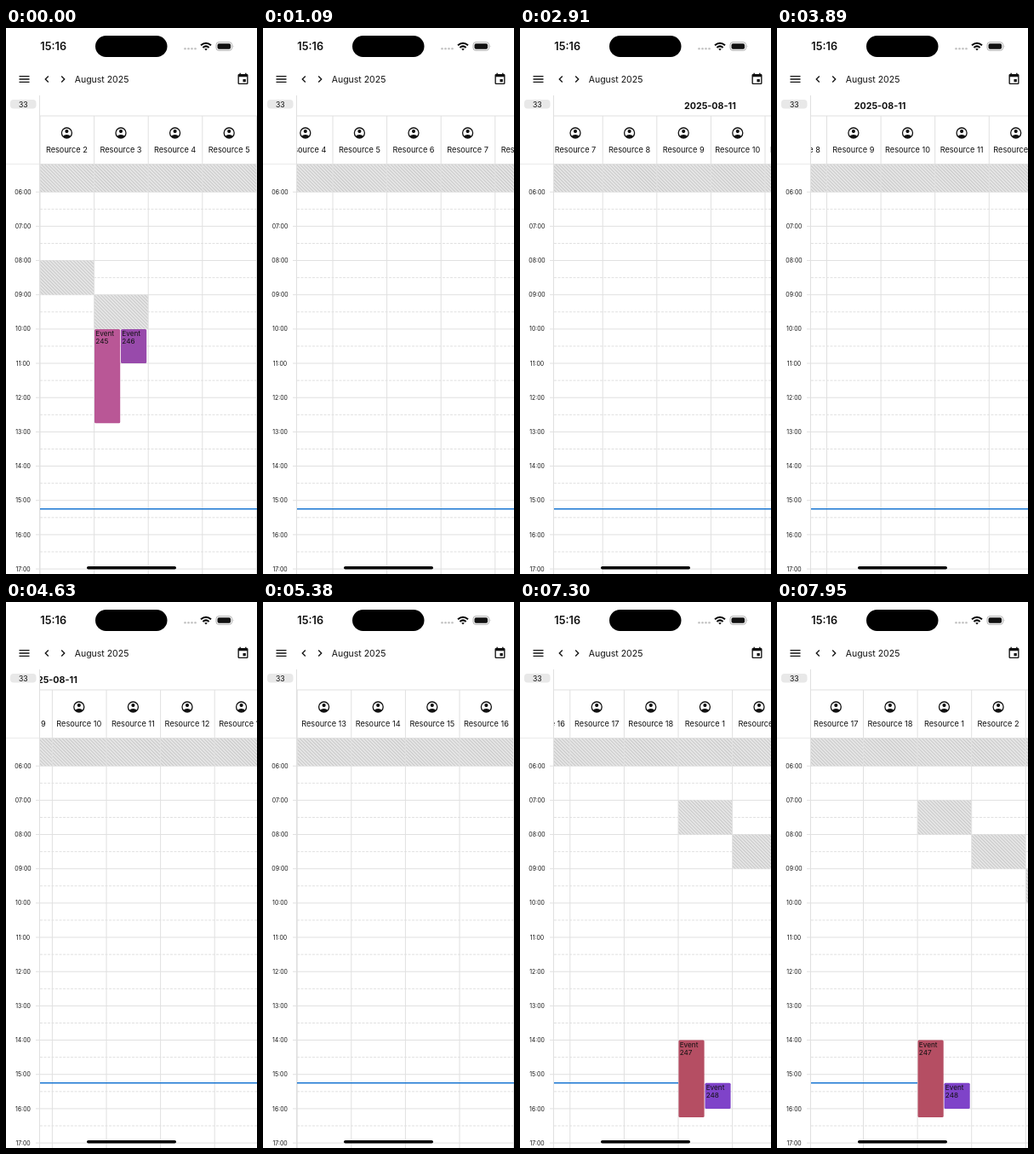
Recreate the animation shown at these times as an HTML page. Size 295 by 640 pixels, loop 8 s.

```html
<!DOCTYPE html>
<html lang="en">
<head>
<meta charset="utf-8">
<title>Resource calendar</title>
<style>
  html, body { margin: 0; width: 100%; height: 100%; overflow: hidden; background: #fff; }
  svg { display: block; width: 295px; height: 640px; font-family: Inter, Roboto, sans-serif; fill: #111; }
  .mid { text-anchor: middle; }
  .rule { stroke: #e0e0e0; stroke-width: 1; fill: none; }
  .half { stroke-dasharray: 3 1.5; }
  .faint { stroke: #ebebeb; }
  .hour { font-size: 6.9px; }
  .name { font-size: 9.2px; }
  .event { font-size: 8.2px; }
  .date { font-size: 10.7px; font-weight: 700; }
</style>
</head>
<body>
<svg viewBox="0 0 295 640">
  <defs>
    <pattern id="hatch" width="2.8" height="2.8" patternUnits="userSpaceOnUse" patternTransform="rotate(-45)">
      <rect width="2.8" height="2.8" fill="#e8e8e8"/>
      <rect width="1.1" height="2.8" fill="#c8c8c8"/>
    </pattern>
    <clipPath id="view"><rect x="39" y="79" width="256" height="561"/></clipPath>
    <g id="person">
      <circle r="6" fill="none" stroke="#111" stroke-width="1.3"/>
      <circle cy="-1.9" r="2.1"/>
      <path d="M-4.4 4.2C-3 1.4 3 1.4 4.4 4.2Q0 8 -4.4 4.2Z"/>
    </g>
  </defs>

  <g id="grid"></g>
  <g clip-path="url(#view)"><g id="content"></g></g>
  <path class="rule" d="M39.5 79V640"/>

  <!-- status bar -->
  <text class="mid" x="55.7" y="26.3" font-size="12.7" font-weight="600">15:16</text>
  <rect x="105" y="9" width="84.5" height="25" rx="12.5" fill="#000"/>
  <g fill="#c4c4c4">
    <circle cx="210.5" cy="24.3" r="1.3"/><circle cx="214.5" cy="24.3" r="1.3"/>
    <circle cx="218.5" cy="24.3" r="1.3"/><circle cx="222.5" cy="24.3" r="1.3"/>
  </g>
  <path d="M229 20.2Q235 15.2 241 20.2M231.4 22.9Q235 19.9 238.6 22.9" fill="none" stroke="#000" stroke-width="2"/>
  <path d="M233.2 24.6Q235 23.2 236.8 24.6L235 26.6Z"/>
  <rect x="247" y="16.7" width="18.6" height="9.6" rx="3" fill="none" stroke="#a5a5a5" stroke-width=".9"/>
  <rect x="248.5" y="18.2" width="15.6" height="6.6" rx="1.8"/>
  <path d="M266.8 19.8q1.3 1.7 0 3.4z" fill="#a5a5a5"/>

  <!-- toolbar -->
  <path transform="translate(13.5 52)scale(.667)" d="M3 18h18v-2H3zM3 13h18v-2H3zM3 6v2h18V6z"/>
  <path transform="translate(40 52)scale(.667)" d="M15.4 7.4L14 6l-6 6 6 6 1.4-1.4L10.8 12z"/>
  <path transform="translate(59 52)scale(.667)" d="M10 6L8.6 7.4l4.6 4.6-4.6 4.6L10 18l6-6z"/>
  <text x="80.7" y="64" font-size="10.5">August 2025</text>
  <path transform="translate(270.5 52)scale(.667)" d="M17 12h-5v5h5zM16 1v2H8V1H6v2H5a2 2 0 0 0-2 2v14a2 2 0 0 0 2 2h14a2 2 0 0 0 2-2V5a2 2 0 0 0-2-2h-1V1zM19 19H5V8h14z"/>
  <rect x="5" y="84" width="30.5" height="10.5" rx="4" fill="#e8e8e8"/>
  <text class="mid" x="20.2" y="92.6" font-size="8.6">33</text>
  <rect x="95" y="631" width="105" height="3.6" rx="1.8" fill="#000"/>
</svg>

<script>
const LOOP = 8000, LEFT = 40, COLUMN = 63.6, RESOURCES = 18, DAY = COLUMN * RESOURCES;
const $ = id => document.getElementById(id);
const hourY = hour => 192.2 + (hour - 6) * 40.17;
const columnX = index => LEFT + index * COLUMN;

const line = (x1, y1, x2, y2, kind = '') =>
  `<path class="rule ${kind}" d="M${x1} ${y1}L${x2} ${y2}"/>`;
const text = (kind, x, y, value) => `<text class="${kind}" x="${x}" y="${y}">${value}</text>`;
const blocked = (index, top, bottom, columns = 1) =>
  `<rect x="${columnX(index)}" y="${top}" width="${COLUMN * columns}" height="${bottom - top}" fill="url(#hatch)"/>`;

function event(index, slot, from, to, color, number) {
  const x = columnX(index) + 0.4 + slot * 31, y = hourY(from);
  return `<rect x="${x}" y="${y}" width="30.2" height="${hourY(to) - y}" rx="1.5" fill="${color}"/>` +
    text('event', x + 1.3, y + 8.2, 'Event') + text('event', x + 1.3, y + 17.6, number);
}

function buildGrid() {
  let out = line(LEFT, 103, 295, 103) + line(0, 159.5, LEFT, 159.5, 'faint') + line(LEFT, 159.5, 295, 159.5);
  for (let hour = 6; hour <= 17; hour++) {
    const y = hourY(hour), halfY = hourY(hour + 0.5);
    out += line(35, y, 295, y) + line(LEFT, halfY, 295, halfY, 'half') +
      text('hour mid', 20, y + 2.6, String(hour).padStart(2, '0') + ':00');
  }
  return out;
}

function buildContent() {
  const count = RESOURCES + 6;
  let out = blocked(0, 160, hourY(6), count);
  for (const first of [0, RESOURCES])
    for (let i = 0; i < 3; i++) out += blocked(first + i, hourY(7 + i), hourY(8 + i));
  for (let i = 0; i < count; i++) {
    const x = columnX(i), middle = x + COLUMN / 2 - 0.4;
    out += line(x, 103, x, 640) + `<use href="#person" x="${middle}" y="123"/>` +
      text('name mid', middle, 145.5, 'Resource ' + (i % RESOURCES + 1));
  }
  const now = hourY(15.25);
  return out + text('date mid', LEFT + DAY / 2 - 1, 94.5, '2025-08-11') +
    `<path d="M${LEFT} ${now}H${LEFT + DAY}" stroke="#1976d2" stroke-width="1.5"/>` +
    event(2, 0, 10, 12.75, '#b95796', 245) + event(2, 1, 10, 11, '#984aab', 246) +
    event(RESOURCES, 0, 14, 16.25, '#b54e63', 247) + event(RESOURCES, 1, 15.25, 16, '#7f43c9', 248);
}

// Bursts of scrolling: start ms, end ms, steps, offset reached
const START = 63.6;
const bursts = [
  [650, 850, 3, 178], [990, 1090, 2, 212.4],
  [1410, 1830, 5, 300], [2050, 2170, 2, 317], [2310, 2310, 1, 322.1], [2410, 2410, 1, 324],
  [2690, 2910, 3, 388], [3470, 3890, 5, 490.3], [4030, 4270, 3, 518],
  [4630, 4860, 3, 638], [5140, 5380, 3, 763], [5480, 5900, 5, 920], [6040, 6280, 3, 964.2],
  [6550, 6910, 4, 990], [7190, 7610, 5, 1012], [7750, 7950, 3, 1019.7]
];

function scrollAt(time) {
  let offset = START;
  for (const [start, end, steps, target] of bursts) {
    if (time < start) break;
    const progress = Math.min(1, (time - start) / (end - start || 1));
    const step = time >= end ? steps : Math.floor(progress * (steps - 1) + 1e-6) + 1;
    offset += (target - offset) * step / steps;
  }
  return offset;
}

$('grid').innerHTML = buildGrid();
$('content').innerHTML = buildContent();

function draw() {
  const offset = scrollAt(performance.now() % LOOP);
  $('content').setAttribute('transform', `translate(${-offset} 0)`);
  requestAnimationFrame(draw);
}
draw();
</script>
</body>
</html>
```
